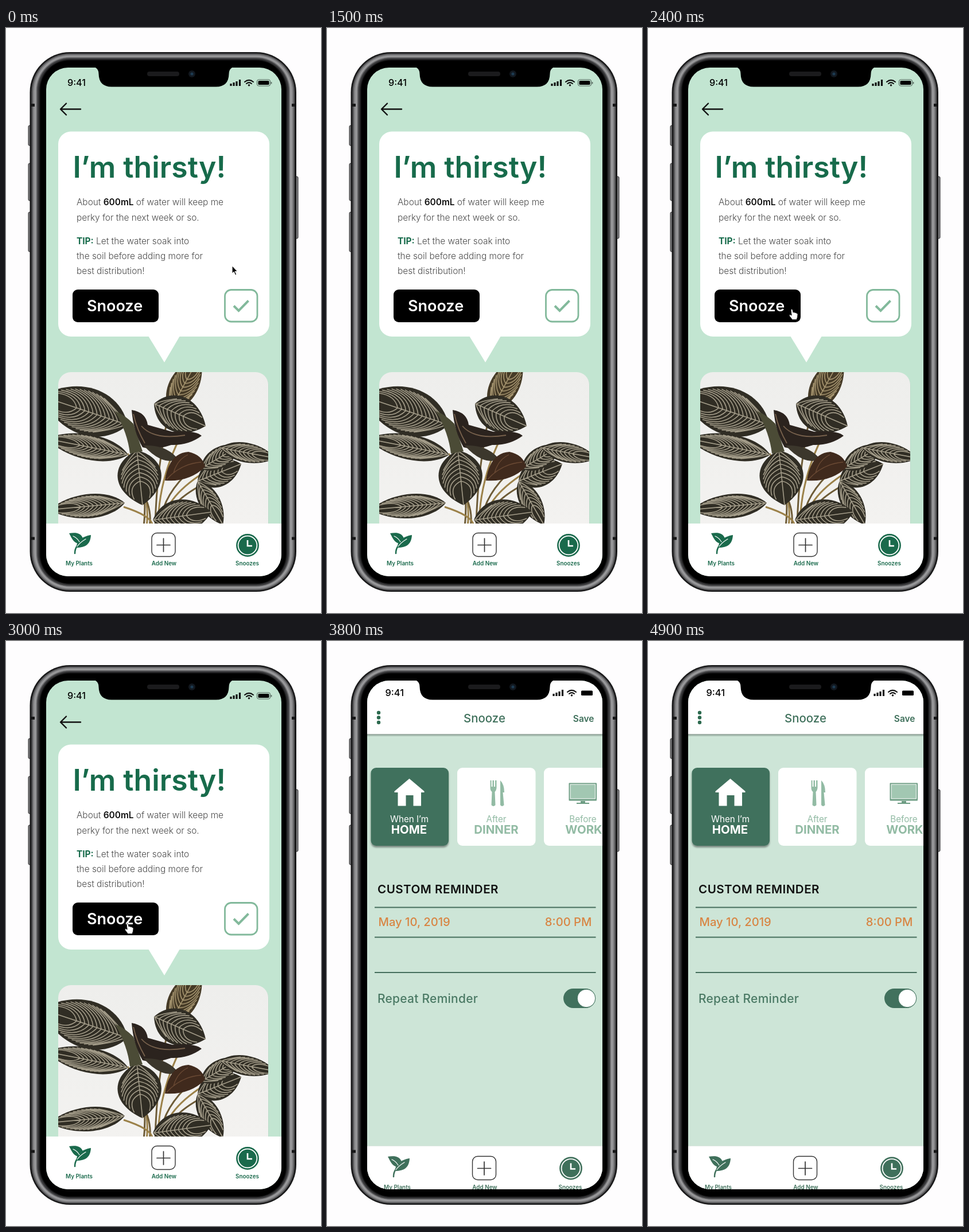
An HTML page that plays this animation: 549x1020 px, repeating every 5000 ms.

```html
<!DOCTYPE html>
<html lang="en">
<head>
<meta charset="utf-8">
<title>Plant reminder</title>
<style>
html, body { margin: 0; width: 100%; height: 100%; overflow: hidden; background: #fefdfe; }
svg { display: block; width: 100vw; height: 100vh; }
text { font-family: Inter, "Open Sans", sans-serif; }
.mid { text-anchor: middle; }
.end { text-anchor: end; }
.copy { font-size: 15.4px; font-weight: 300; fill: #4a4a4a; }
.copy .strong { font-weight: 600; fill: #111; }
.copy .tip { font-weight: 700; fill: #176b4b; }
.tab { font-size: 9.9px; font-weight: 600; text-anchor: middle; }
.small { font-size: 15.2px; }
.big { font-size: 20.4px; font-weight: 700; }
.line { fill: none; stroke-linecap: round; stroke-linejoin: round; }

.snooze { animation: swap 5s step-end infinite; }
.pointer { animation: move 5s infinite, show 5s step-end infinite; }
.arrow { animation: arrow 5s step-end infinite; }
.hand { animation: hand 5s step-end infinite; }

@keyframes swap { 0% { opacity: 0 } 76%, 100% { opacity: 1 } }
@keyframes show { 0% { opacity: 1 } 8% { opacity: 0 } 40% { opacity: 1 } 76%, 100% { opacity: 0 } }
@keyframes arrow { 0% { opacity: 1 } 48%, 100% { opacity: 0 } }
@keyframes hand { 0% { opacity: 0 } 48%, 100% { opacity: 1 } }
@keyframes move {
  0% { transform: translate(394px, 414px); animation-timing-function: steps(4) }
  8% { transform: translate(535px, 530px); animation-timing-function: step-end }
  40% { transform: translate(497px, 503px); animation-timing-function: steps(2) }
  44% { transform: translate(350px, 500px); animation-timing-function: steps(2) }
  48% { transform: translate(251px, 490px); animation-timing-function: steps(4) }
  56%, 100% { transform: translate(212px, 492px) }
}
</style>
</head>
<body>
<svg viewBox="0 0 549 1020" preserveAspectRatio="none">
  <defs>
    <clipPath id="screen"><rect x="70" y="69" width="410" height="887" rx="38"/></clipPath>
    <clipPath id="photo"><rect x="91" y="600" width="366" height="300" rx="22"/></clipPath>
    <linearGradient id="wall" x2="0" y2="1">
      <stop offset="0" stop-color="#eeeeec"/>
      <stop offset="1" stop-color="#f3f2f0"/>
    </linearGradient>
    <filter id="shadow" x="-20%" y="-20%" width="140%" height="150%">
      <feDropShadow dx="0" dy="3" stdDeviation="1.8" flood-opacity=".4"/>
    </filter>
    <g id="sprout">
      <path d="M1 1C12-1 22 0 25 10C21 13 20 16 18 19C8 18 5 8 1 1Z" fill="currentColor"/>
      <path d="M39 4C38 20 30 26 14 26C13 15 22 7 39 4Z" fill="currentColor"/>
      <path class="line" d="M11 36C11 30 12 27 15 23" stroke="currentColor" stroke-width="2.5"/>
      <path class="line" d="M15 24Q20 17 30 11M8 6Q15 9 19 16" stroke="#fff" stroke-width="1.1"/>
    </g>
    <g id="add" class="line" stroke="#333">
      <rect x="-20.5" y="-20.5" width="41" height="41" rx="9" stroke-width="1.4"/>
      <path d="M-11.5 .5H11.5M0-11V12" stroke-width="1.7"/>
    </g>
    <g id="clock">
      <circle r="18.6" fill="#fff" stroke="currentColor" stroke-width="2.6"/>
      <circle r="15.5" fill="currentColor"/>
      <path d="M0-9V1H8" fill="none" stroke="#fff" stroke-width="2.6"/>
    </g>
    <g id="signal">
      <path d="M1.5 7V11M6.5 5V11M11.5 3V11M17 0V11" stroke="#111" stroke-width="3.2"/>
      <g class="line" stroke="#111" stroke-width="2.1">
        <path d="M25.5 4Q33-2.2 40.5 4M28.5 7Q33 3.4 37.5 7"/>
        <circle cx="33" cy="9.7" r=".7"/>
      </g>
    </g>
  </defs>

  <!-- Phone body -->
  <g fill="#808082" stroke="#29292a">
    <rect x="39" y="170" width="6" height="35" rx="2"/>
    <rect x="39" y="236" width="6" height="65" rx="2"/>
    <rect x="39" y="321" width="6" height="69" rx="2"/>
    <rect x="502" y="259" width="7" height="108" rx="2"/>
  </g>
  <g id="bezel"></g>
  <path d="M42 134.5H50M42 890H50M498 134.5H506M498 890H506" stroke="#161617" stroke-width="5"/>

  <g clip-path="url(#screen)">
    <!-- Watering card -->
    <g>
      <rect x="70" y="69" width="410" height="887" fill="#c2e5d1"/>
      <text x="107" y="101" font-size="16.2" font-weight="500">9:41</text>
      <use href="#signal" x="390.5" y="90"/>
      <rect x="437.5" y="90" width="23" height="11" rx="3" fill="none" stroke="#4c5d54"/>
      <rect x="439.5" y="92" width="19" height="7" rx="1.5"/>
      <path d="M462.5 94V97.5" stroke="#4c5d54" stroke-width="1.5"/>
      <path class="line" d="M130 141.5H95M105 131.5L95 141.5L105 151.5" stroke="#111" stroke-width="2.4"/>

      <rect x="91" y="180.5" width="368" height="357.5" rx="22" fill="#fff"/>
      <path d="M248 537H303L276 583Z" fill="#fff"/>
      <text x="116.5" y="261" font-size="51.7" font-weight="600" fill="#176b4b">I’m thirsty!</text>
      <g class="copy">
        <text x="123" y="309">About <tspan class="strong">600mL</tspan> of water will keep me</text>
        <text x="123" y="335.5">perky for the next week or so.</text>
        <text x="123" y="376.5"><tspan class="tip">TIP:</tspan> Let the water soak into</text>
        <text x="123" y="403">the soil before adding more for</text>
        <text x="123" y="429">best distribution!</text>
      </g>
      <rect x="116" y="456" width="150" height="57" rx="9"/>
      <text class="mid" x="189.5" y="494" font-size="27" font-weight="600" fill="#fff">Snooze</text>
      <g class="line" stroke="#82b99b">
        <rect x="381.5" y="456.5" width="56.5" height="55.5" rx="11" stroke-width="2.8"/>
        <path d="M397 484.5L405.5 493L422.500 475.500" stroke-width="4" stroke-linecap="butt" stroke-linejoin="miter"/>
      </g>

      <rect x="91" y="601" width="366.500" height="290" rx="22" fill="#b2d4c1"/>
      <g clip-path="url(#photo)">
        <rect x="91" y="600" width="366" height="270" fill="url(#wall)"/>
        <g id="plant"></g>
      </g>
      <g color="#1a6a4c">
        <rect x="70" y="864" width="410" height="92" fill="#fff"/>
        <use href="#sprout" x="109" y="880"/>
        <use href="#add" x="274.5" y="901"/>
        <use href="#clock" x="421" y="902"/>
        <g class="tab" fill="currentColor">
          <text x="127.5" y="937">My Plants</text>
          <text x="275.5" y="937">Add New</text>
          <text x="420.5" y="937">Snoozes</text>
        </g>
      </g>
    </g>

    <!-- Snooze settings -->
    <g class="snooze" color="#3f705b">
      <rect x="70" y="69" width="410" height="887" fill="#cde5d7"/>
      <rect x="70" y="164" width="410" height="2" fill="#aac0b3"/>
      <rect x="70" y="69" width="410" height="94" fill="#fff"/>
      <path d="M70 163H480" stroke="#87988e" stroke-width="1.4"/>
      <text x="101.5" y="96" font-size="16.4" font-weight="500">9:41</text>
      <use href="#signal" x="393.5" y="85"/>
      <rect x="443" y="86.5" width="20" height="8.5" rx="1.5"/>
      <g fill="#2d6a4f">
        <circle cx="90" cy="125" r="3.2"/><circle cx="90" cy="133.5" r="3.2"/><circle cx="90" cy="142" r="3.2"/>
      </g>
      <text class="mid" x="274.5" y="142" font-size="20.4" font-weight="500" fill="currentColor">Snooze</text>
      <text class="end" x="465.5" y="140.5" font-size="15.5" font-weight="600" fill="currentColor">Save</text>

      <g class="mid" fill="#fff">
        <rect x="76.5" y="221" width="135.5" height="136" rx="9" fill="#41715d" filter="url(#shadow)"/>
        <path d="M117.5 262L143.5 240L169.5 262V264H164V287.5H150.5V269H137.5V287.5H123.5V264H117.5Z"/>
        <text class="small" x="143.5" y="316">When I’m</text>
        <text class="big" x="143" y="336">HOME</text>
      </g>
      <g class="mid" fill="#92bba4">
        <rect x="227" y="221" width="136.5" height="136" rx="9" fill="#fff"/>
        <rect x="378" y="221" width="136" height="136" rx="9" fill="#fff"/>
        <path d="M284.5 243H286.5V254H288.5V243H291V254H293V243H295.5V256Q295 261 292.5 263L293.5 286Q290 290 286.5 286L287.5 263Q284.5 261 284.5 256Z"/>
        <path d="M302 243Q309 250 309 264H306.5L308.5 286Q305 290 302 286Z"/>
        <text class="small" x="295" y="316">After</text>
        <text class="big" x="295" y="336">DINNER</text>
        <rect x="421.5" y="247.5" width="48.5" height="31" rx="1" fill="#6e9d84"/>
        <rect x="424" y="250" width="43.5" height="25" fill="#a2c7b2" stroke="#fff"/>
        <path d="M442 279H450V282H457V284H435V282H442Z" fill="#6e9d84"/>
        <text class="small" x="446" y="316">Before</text>
        <text class="big" x="447.5" y="336">WORK</text>
      </g>

      <text x="88" y="440" font-size="20.6" font-weight="600" letter-spacing=".5" fill="#111">CUSTOM REMINDER</text>
      <path d="M83 464.5H468.5M83 516.5H468.5M83 578H468.5" stroke="#466f5d" stroke-width="2"/>
      <g font-size="20.2" font-weight="500" fill="#d88543">
        <text x="89.5" y="497">May 10, 2019</text>
        <text class="end" x="461.5" y="497">8:00 PM</text>
      </g>
      <text x="88" y="630.5" font-size="20.9" font-weight="500" letter-spacing=".3" fill="#4a7964">Repeat Reminder</text>
      <rect x="412" y="606" width="56" height="34" rx="17" fill="#41715d"/>
      <circle cx="452" cy="623" r="15.8" fill="#fff" stroke="#41715d"/>

      <rect x="70" y="881" width="410" height="75" fill="#fff"/>
      <path d="M70 880.5H480" stroke="#dce6df"/>
      <use href="#sprout" x="105" y="898"/>
      <use href="#add" x="274" y="919"/>
      <use href="#clock" x="425" y="919.5"/>
      <g class="tab" fill="currentColor">
        <text x="122.5" y="955.5">My Plants</text>
        <text x="275" y="955.5">Add New</text>
        <text x="424" y="955.5">Snoozes</text>
      </g>
    </g>
  </g>

  <!-- Notch -->
  <path d="M150 67Q161.500 69 161.500 80Q162 102.500 184 102.500H366Q388 102.500 388.500 80Q388.500 69 400 67Z"/>
  <rect x="246" y="76" width="56" height="8" rx="4" fill="#1b1b1d"/>
  <circle cx="324" cy="80" r="6" fill="#12181f"/>
  <circle cx="324" cy="80" r="2.6" fill="#1d3a50"/>

  <g class="pointer">
    <path class="arrow" d="M0 0V14.5L3.2 11.6L5.5 17L7.9 16L5.6 10.7H9.8Z" stroke="#fff" stroke-width="1.2"/>
    <path class="hand" d="M-2 1.5Q-.5-.8 1 1.5L2 6Q4 4.8 5 6.5Q7 5.5 7.8 7.5Q10 7 10 9.5L9.500 14L8 18.500H.5L-4.500 12Q-5.500 9.500-3 9.800L-.8 11Z" fill="#fff" stroke="#222"/>
  </g>
</svg>
<script>
function draw(tag, attrs, parent) {
  const el = document.createElementNS("http://www.w3.org/2000/svg", tag);
  for (const key in attrs) el.setAttribute(key, attrs[key]);
  parent.append(el);
}

// Metal rim as nested bands: distance from the outer edge and colour.
const rim = [[0, "#19191a"], [3, "#58585a"], [5.5, "#858587"], [8, "#9a9a9c"], [11, "#6c6c6e"], [13, "#38383a"], [16, "#19191a"], [18, "#000"]];
for (const [inset, fill] of rim) {
  draw("rect", {
    x: 41.5 + inset, y: 42 + inset * .8,
    width: 464.5 - 2 * inset, height: 941 - 1.6 * inset,
    rx: 70 - inset, fill
  }, bezel);
}

const plant = document.getElementById("plant");
const shape = (d, attrs) => draw("path", { d, ...attrs }, plant);

// A leaf from base to tip, with long pale veins sweeping towards the tip.
function leaf(x0, y0, x1, y1, width, fill = "#302d24", vein = "#a29b88") {
  const len = Math.hypot(x1 - x0, y1 - y0);
  const turn = Math.atan2(y1 - y0, x1 - x0) * 180 / Math.PI;
  const transform = `translate(${x0} ${y0}) rotate(${turn})`;
  const bow = width * .67;
  shape(`M0 0C${len * .2} ${bow} ${len * .7} ${bow} ${len} 0C${len * .7} ${-bow} ${len * .2} ${-bow} 0 0Z`,
    { fill, transform });
  const half = t => 1.7 * t * (1 - t) * width;
  const count = Math.round(len / 12);
  let d = `M0 0H${len}`;
  for (let i = 0; i < count; i++) {
    const t = .02 + .62 * i / count;
    for (const side of [-1, 1]) {
      d += `M${t * len} 0Q${(t + .08) * len} ${side * half(t + .12) * .8} ${(t + .32) * len} ${side * half(t + .32)}`;
    }
  }
  shape(d, { fill: "none", stroke: vein, "stroke-width": 1.6, transform });
}

const stems = [[208, 690], [212, 742], [232, 800], [205, 835], [285, 665], [300, 720], [312, 780], [345, 775], [335, 800]];
stems.forEach(([x, y], i) => shape(
  `M${240 + i * 5} 870Q${250 + i * 3} ${(870 + y) / 2} ${x} ${y}`,
  { fill: "none", stroke: i % 2 ? "#9b8149" : "#6d5b37", "stroke-width": 3 }
));

leaf(285, 668, 338, 572, 50, "#463b27", "#a5946f");
leaf(258, 655, 348, 694, 62);
leaf(212, 692, 62, 642, 82);
leaf(213, 744, 70, 716, 44);
leaf(207, 828, 76, 840, 42);
leaf(334, 790, 410, 760, 48);
leaf(340, 768, 408, 728, 36);
leaf(374, 732, 470, 750, 34);
leaf(334, 790, 378, 866, 36);
leaf(256, 858, 358, 844, 58);
leaf(228, 736, 238, 832, 76);
shape("M190 668Q206 674 222 690L238 738L216 742Q212 706 190 668Z", { fill: "#4b4b36" });
shape("M219 666Q244 670 247 692L290 704Q330 701 341 711Q318 728 288 727Q258 737 238 731Q222 704 219 666Z", { fill: "#2b231e" });
shape("M236 694Q258 719 312 710M222 673Q228 700 242 724", { fill: "none", stroke: "#77614c", "stroke-width": 1.8 });
shape("M240 728Q280 726 300 752Q272 764 240 728Z", { fill: "#3c372c" });
shape("M277 789Q284 741 318 739Q342 744 347 765Q320 792 277 789Z", { fill: "#402a1d" });
shape("M280 787Q304 760 340 757M292 776Q298 753 317 744", { fill: "none", stroke: "#6b4a34", "stroke-width": 1.3 });
</script>
</body>
</html>
```
